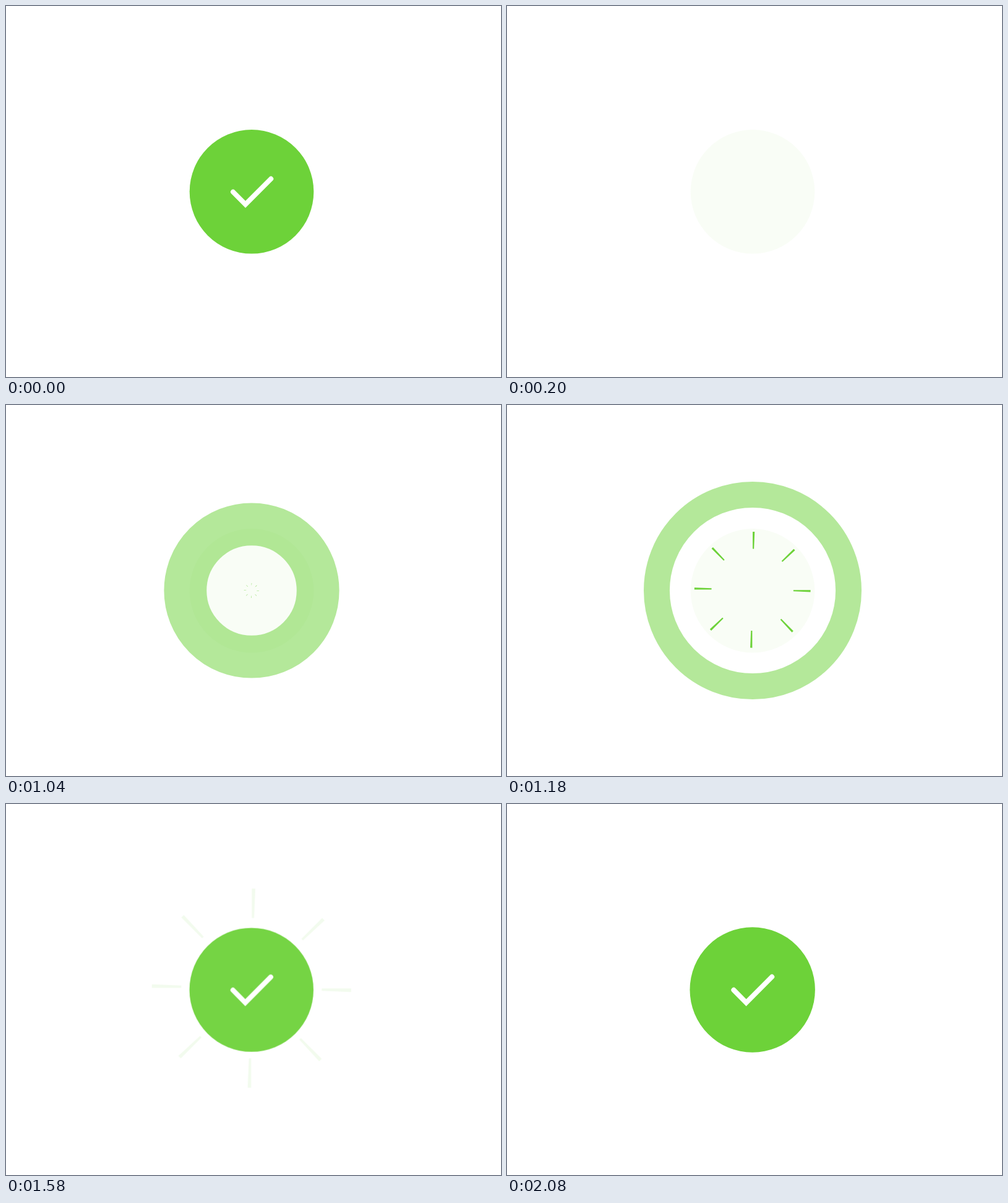
Recreate the animation shown at these times as an HTML page. Size 800 by 600 pixels, loop 3600 ms.

```html
<!DOCTYPE html>
<html lang="en">
<head>
<meta charset="utf-8">
<title>Check burst</title>
<style>
  html, body { margin: 0; width: 100%; height: 100%; overflow: hidden; background: #fff; }
  svg { display: block; width: 100%; height: 100%; }
</style>
</head>
<body>
<svg viewBox="0 0 800 600">
  <circle cx="397" cy="300.3" r="100.3" fill="#6dd239" opacity=".045"/>
  <circle id="ring" cx="397" cy="300" fill="none" stroke="#6dd239" opacity=".51"/>
  <g id="rays" fill="#6dd239"></g>
  <circle id="pulse" cx="397" cy="300" fill="#6dd239"/>
  <g id="badge">
    <circle r="100.3" fill="#6dd239"/>
    <path d="M-30 .4L-10 20.6L31.2 -20.8" fill="none" stroke="#fff" stroke-width="8" stroke-linecap="round"/>
  </g>
</svg>
<script>
const LOOP = 3600, STEP = 20;
const [ring, rays, pulse, badge] = ['ring', 'rays', 'pulse', 'badge'].map(id => document.getElementById(id));

for (let i = 0; i < 8; i++) {
  const ray = document.createElementNS(rays.namespaceURI, 'path');
  ray.setAttribute('d', 'M-1.8 -113.5L-2.8 -161H2.8L1.8 -113.5Z');
  ray.setAttribute('transform', `rotate(${i * 45 + 1.2})`);
  rays.append(ray);
}

const progress = (t, start, end) => Math.min(1, Math.max(0, (t - start) / (end - start)));
const smooth = x => x * x * (3 - 2 * x);
const easeOut = x => 1 - (1 - x) ** 2;

function set(el, attributes) {
  for (const name in attributes) el.setAttribute(name, attributes[name]);
}

function place(el, x, y, scale, opacity) {
  set(el, { transform: `translate(${x} ${y}) scale(${scale})`, opacity });
}

function draw(t) {
  const outer = 176 * smooth(progress(t, 820, 1127));
  const inner = Math.min(outer, 176 * easeOut(progress(t, 922, 1426)));
  set(ring, { r: (outer + inner) / 2, 'stroke-width': outer - inner });

  const spread = smooth(progress(t, 980, 1340));
  place(rays, 396.7, 300.2 - 2.4 * spread, spread, 1 - progress(t, 1370, 1600));

  set(pulse, {
    r: 180 * smooth(progress(t, 1558, 1865)),
    opacity: Math.min(0.5, 0.41 * (1 - progress(t, 1780, 2080)) + 0.41 * Math.max(0, 1780 - t) / 300)
  });

  if (t < 840) {
    place(badge, 397, 300.3, 1, 1 - progress(t, 0, 200));
  } else {
    const pop = progress(t, 1291, 1598);
    const scale = smooth(pop);
    place(badge, 396.7, 303.4 - 2.9 * scale, 1.009 * scale, pop);
  }
}

const origin = performance.now();
function tick() {
  const elapsed = (performance.now() - origin) % LOOP;
  draw(Math.floor(elapsed / STEP) * STEP);
  requestAnimationFrame(tick);
}
tick();
</script>
</body>
</html>
```
